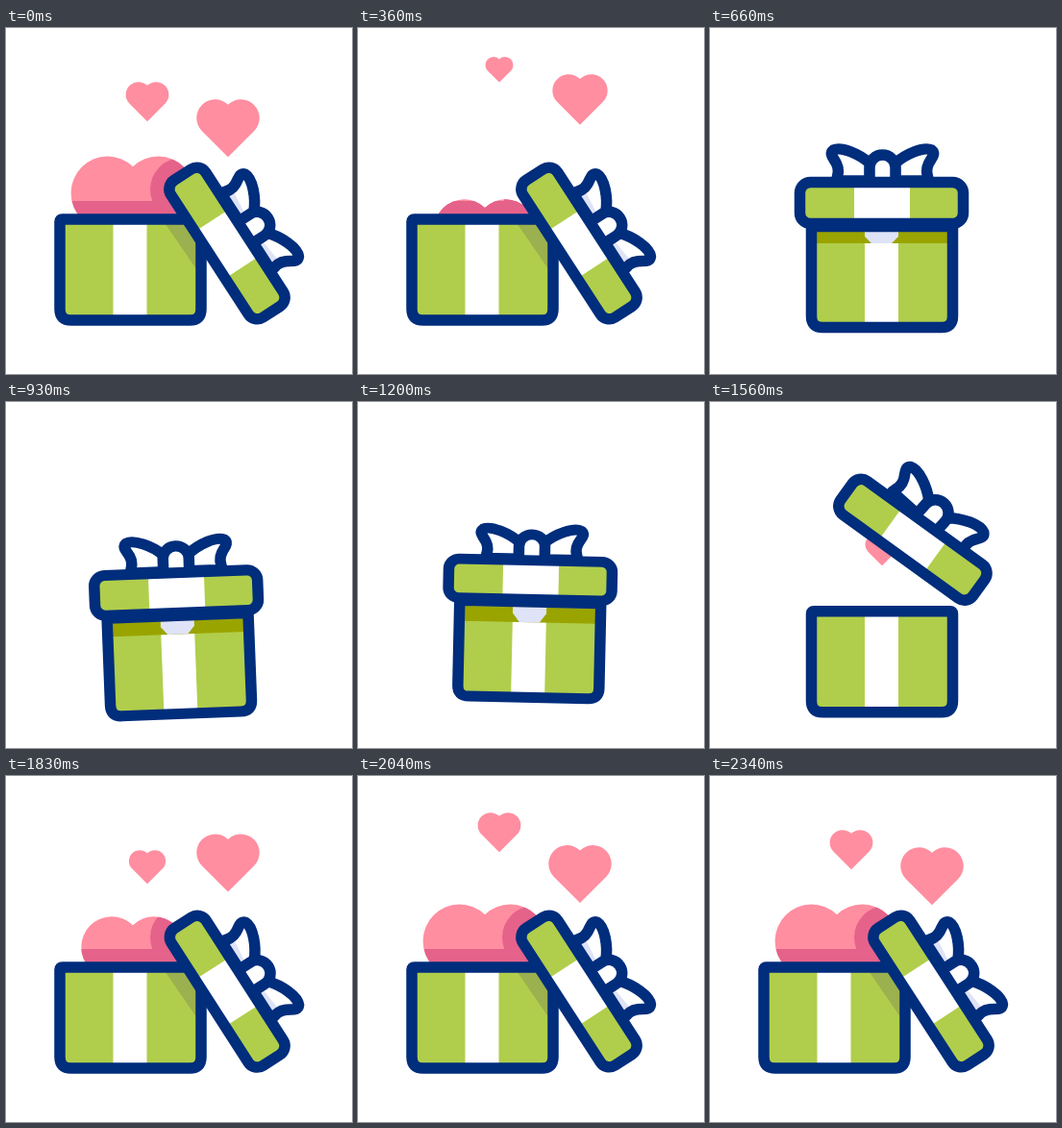
Write an HTML page that moves like this. It is 360 by 360 pixels and loops after 2.52 s.

```html
<!DOCTYPE html>
<html lang="en">
<head>
<meta charset="utf-8">
<title>Gift box</title>
<style>
  html, body { margin: 0; height: 100%; overflow: hidden; background: #fff; }
  svg { display: block; width: 100vw; height: 100vh; }
  .line { stroke: #002d7c; stroke-width: 11.5; stroke-linejoin: round; }
  .pink { fill: #ff8ea0; }
  .rose { fill: #e5628a; }
  .green { fill: #b0ce4b; }
  .olive { fill: #9aa400; }
  .white { fill: #fff; }
  .mist { fill: #dfe3f7; }
  .none { fill: none; }
</style>
</head>
<body>
<svg viewBox="0 0 360 360">
  <defs>
    <path id="heart" d="M0 1.414L-1.414 0A1 1 0 0 1 0-1.414A1 1 0 0 1 1.414 0Z"/>
    <path id="loop" d="M-48-24C-46-32-45-36-48-42C-51-48-56-52-51-56C-43-60-24-52-13-42V-24Z"/>
    <clipPath id="inHeart"><use id="clipHeart" href="#heart"/></clipPath>
  </defs>
  <use id="inner" class="pink" href="#heart"/>
  <g class="rose" clip-path="url(#inHeart)">
    <rect x="40" y="180" width="200" height="120"/>
    <circle id="cast" cx="183" cy="168" r="33"/>
  </g>
  <use id="small" class="pink" href="#heart"/>
  <use id="large" class="pink" href="#heart"/>
  <g id="gift">
    <g id="body">
      <path class="green" d="M106 206H253V300Q253 312 241 312H118Q106 312 106 300Z"/>
      <path class="white" d="M161 206h35v106h-35z"/>
      <path id="slant" fill="#9bb04e" d="M215 211h33v48z"/>
      <g id="band">
        <path class="olive" d="M110 200h138v12h-138z"/>
        <path class="mist" d="M161 200h35v5l-7 7h-21l-7-7z"/>
      </g>
      <path class="line none" d="M108 206.500H250Q252.500 206.500 252.500 209V300Q252.500 311.500 241 311.500H117Q105.500 311.500 105.500 300V209Q105.500 206.500 108 206.500Z"/>
    </g>
    <g id="lid">
      <g id="bow">
        <use class="white" href="#loop"/>
        <use class="white" href="#loop" transform="scale(-1 1)"/>
        <path id="bowShade" class="mist" d="M-44-24L-42-36L-14-33V-24ZM44-24L42-36L14-33V-24Z"/>
        <use class="line none" href="#loop"/>
        <use class="line none" href="#loop" transform="scale(-1 1)"/>
        <path class="line white" d="M-13.500-24V-38A13.500 13 0 0 1 13.500-38V-24"/>
      </g>
      <rect class="green" x="-85" y="-21.500" width="170" height="43" rx="11"/>
      <path class="white" d="M-28.500-20h58v40h-58z"/>
      <rect class="line none" x="-85" y="-21.500" width="170" height="43" rx="11"/>
    </g>
  </g>
</svg>
<script>
const LOOP = 2520, STEP = 30, REST = 2340, HALF = 1000;
const { PI, sin, cos, min, max } = Math;

const set = (id, name, value) => document.getElementById(id).setAttribute(name, value);
const mix = (a, b, p) => a + (b - a) * p;

// Progress of t through the span from a to b, clamped to 0..1
const span = (t, a, b) => min(1, max(0, (t - a) / (b - a)));
const smooth = u => u * u * (3 - 2 * u);
const cubicOut = u => 1 - (1 - u) ** 3;
const backOut = (u, s) => 1 + (s + 1) * (u - 1) ** 3 + s * (u - 1) ** 2;
const bump = u => sin(PI * u);

const floaters = [
  { id: "large", x: 231, y: 107, r: 19.3, lift: 31, power: 6, from: 212, start: 1478, end: 2112, over: 2 },
  { id: "small", x: 147, y: 78.5, r: 13.2, lift: 35, power: 3, from: 200, start: 1745, end: 2165, over: 2.8 }
];

function placeHeart(id, x, y, r) {
  set(id, "transform", `translate(${x} ${y}) scale(${max(r, 0)})`);
}

// Drift up and shrink away, later spring out of the box
function drawFloater(h, t) {
  if (t < HALF) {
    const shrink = 1 - span(t, 0, 510) ** h.power;
    placeHeart(h.id, h.x, h.y - h.lift * smooth(span(t, 0, 400)), h.r * shrink);
  } else {
    const p = backOut(span(t, h.start, h.end), h.over);
    const x = mix(179, h.x, smooth(span(t, 1560, 1740)));
    placeHeart(h.id, x, mix(h.from, h.y, p), h.r * min(1, p));
  }
}

function drawInner(t) {
  let x = 132, y, r;
  if (t < HALF) {
    const q = span(t, 0, 450) ** 3;
    y = 198 + 64 * q;
    r = q < 1 ? 38 * (1 - 0.36 * q) : 0;
  } else {
    const p = cubicOut(span(t, 1650, 2050));
    y = mix(210, 198, p);
    r = 38 * p;
  }
  for (const id of ["inner", "clipHeart"]) placeHeart(id, x, y, r);
}

function drawGift(t) {
  const closing = t < HALF;
  const slide = closing ? 1 - smooth(span(t, 360, 510)) : smooth(span(t, 1590, 1800));
  const flip = closing ? 1 - smooth(span(t, 360, 540)) : backOut(span(t, 1506, 1846), 2);
  const arc = bump(min(1, max(0, flip)));

  // Two hops with a tilt that dies away
  const hop = span(t, 660, 1380), phase = 4 * PI * hop;
  const squash = (1 - cos(phase)) / 2;
  const tilt = -5 * sin(phase / 2) * (1 - hop);
  const dy = 15 * (bump(span(t, 450, 630)) - sin(phase)) + squash;
  const recoil = 16 * bump(span(t, 1500, 1740));

  set("gift", "transform",
    `translate(179 ${219 + dy}) rotate(${tilt}) scale(1 ${1 - 0.055 * squash}) translate(-179 -219)`);
  set("body", "transform", `translate(${-49.5 * slide} ${recoil - 7.5 * slide})`);
  set("lid", "transform",
    `translate(${mix(178.5, 230, flip)} ${mix(182, 224, flip) - 71 * arc}) rotate(${57 * flip})`);
  set("bow", "transform", `translate(1 1) rotate(${6.5 * arc} 0 -21)`);

  for (const id of ["slant", "bowShade", "cast"]) set(id, "opacity", slide);
  set("band", "opacity", max(0, 1 - 3 * flip));
  set("band", "transform", `translate(0 212) scale(1 ${1 + 0.4 * squash}) translate(0 -200)`);
}

function draw(t) {
  for (const h of floaters) drawFloater(h, t);
  drawInner(t);
  drawGift(t);
}

const start = performance.now();
function tick() {
  const t = (performance.now() - start) % LOOP;
  draw(min(Math.floor(t / STEP) * STEP, REST));
  requestAnimationFrame(tick);
}
tick();
</script>
</body>
</html>
```
